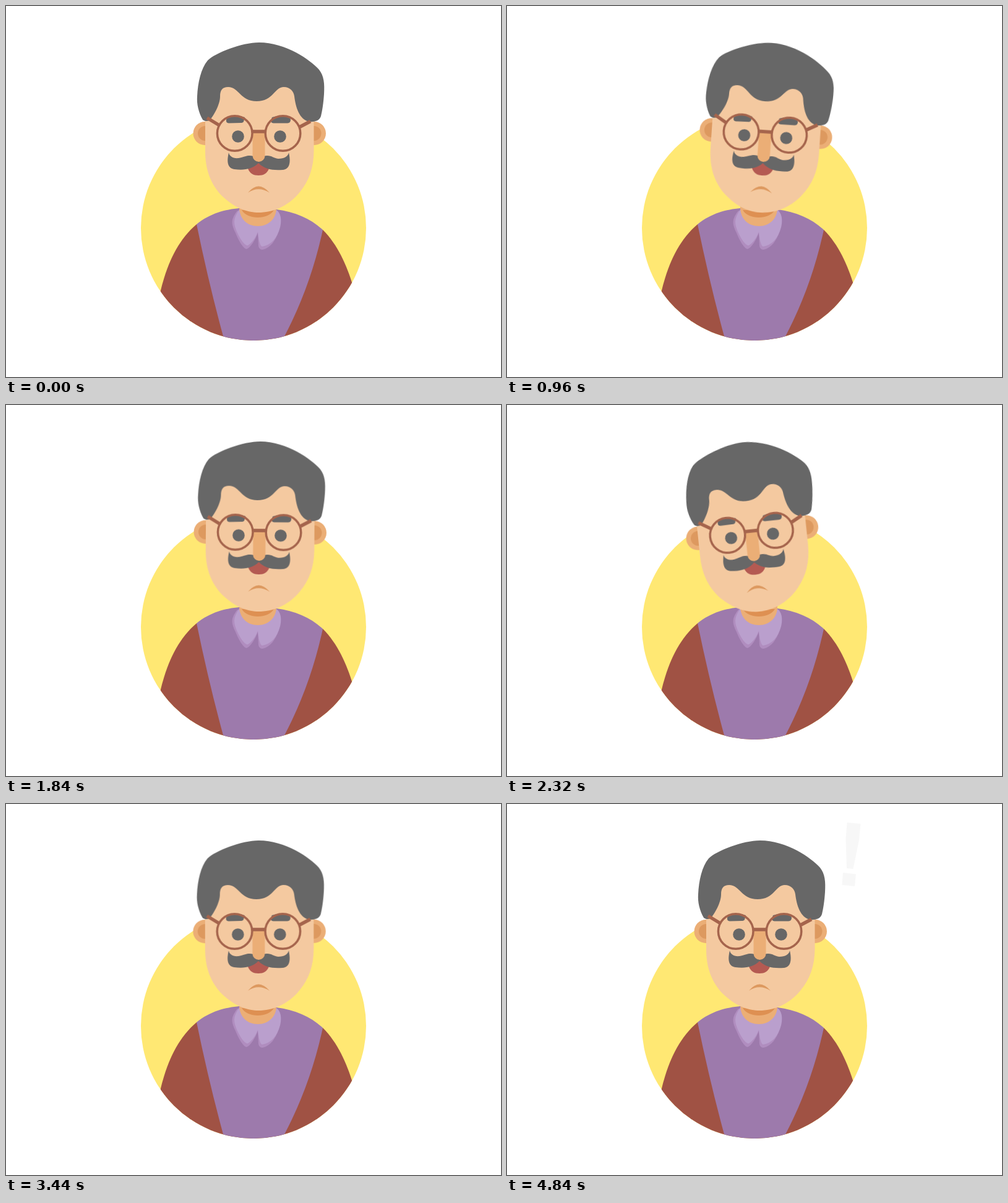
Write an HTML page that moves like this. It is 800 px wide and 600 px high and loops after 5040 ms.

```html
<!DOCTYPE html>
<html lang="en">
<head>
<meta charset="utf-8">
<title>Shaking head</title>
<style>
  html, body { margin: 0; width: 100%; height: 100%; overflow: hidden; background: #fff; }
  svg { display: block; width: 100%; height: 100%; }
  .yellow { fill: #ffe873; }
  .sleeve { fill: #a05244; }
  .vest { fill: #9d7aac; }
  .collar-back { fill: #b08dbf; }
  .collar { fill: #ba9fcd; }
  .skin { fill: #f4c9a0; }
  .tan { fill: #ebae76; }
  .shade { fill: #dd995f; }
  .shadow { fill: #de9052; }
  .lips { fill: #b45a52; }
  .grey { fill: #676767; }
  .glasses { fill: none; stroke: #a5644c; stroke-width: 3.5; }

  .head {
    transform-origin: 409px 336px;
    animation: shake 5040ms cubic-bezier(.33, 0, .67, 1) infinite;
  }
  .mark {
    transform-origin: 552px 132px;
    animation: pop 5040ms ease-out infinite, fade 5040ms linear infinite;
  }
  @keyframes shake {
    0%, 7.2% { transform: rotate(0deg); }
    27.1% { transform: rotate(6deg); }
    46.9% { transform: rotate(-6deg); }
    50% { transform: rotate(-6deg); }
    69.8%, 100% { transform: rotate(0deg); }
  }
  @keyframes pop {
    0%, 69.05% { transform: rotate(-5deg) scale(0); }
    73% { transform: rotate(5deg) scale(1); }
    75.4% { transform: rotate(-2deg) scale(1); }
    77.78%, 100% { transform: rotate(0deg) scale(1); }
  }
  @keyframes fade {
    0%, 84.92% { opacity: 1; }
    96.03%, 100% { opacity: .05; }
  }
</style>
</head>
<body>
<svg viewBox="0 0 800 600">
  <defs>
    <clipPath id="disc"><circle cx="400" cy="359" r="182"/></clipPath>
  </defs>

  <circle class="yellow" cx="400" cy="359" r="182"/>

  <g clip-path="url(#disc)">
    <path class="sleeve" d="M249 464C259 421 276 380 308 353L512 362C536 386 550 418 560 450V560H249Z"/>
    <path class="vest" d="M308 353C330 335 355 329 377 327L437 329C468 333 494 345 512 362Q492 455 449 536V560H358L351 534Q328 450 308 353Z"/>
  </g>

  <path class="collar-back" d="M374 331C364 344 363 351 371 367C376 380 384 393 389 393C395 391 403 378 407 367L408 388C409 392 411 394 415 394C428 391 436 378 440 366L407 340Z"/>
  <path class="collar" d="M377 329C367 345 367 350 374 367C379 378 387 389 391 387C397 384 404 374 407 365C408 376 410 388 414 389C428 387 438 376 443 358C445 350 446 336 437 330Z"/>
  <path class="tan" d="M377 320V327C378 345 390 356 407 356C425 356 437 343 437 327V320Z"/>
  <path class="shadow" d="M381 330C390 346 424 346 433 330Z"/>

  <g class="head">
    <circle class="tan" cx="321.5" cy="206" r="19"/>
    <circle class="tan" cx="498" cy="206" r="19"/>
    <circle class="shade" cx="322" cy="206" r="12"/>
    <circle class="shade" cx="497.500" cy="206" r="12"/>
    <path class="skin" d="M322 120V235C322 265 331 289 350 308C371 328 392 334 408 334C430 334 455 325 474 302C490 283 497 262 497.500 235V120Z"/>
    <path class="grey" d="M318 184C311 172 308 158 309 146C310 124 315 101 326 88C338 76 381 59 409 59C452 59 492 87 506 103C514 113 515 126 514 142C513 158 511 170 509 178C507 186 497 188 490 187C474 184 468 163 466 146C465 138 459 131 449 131C434 131 432 154 405 154C379 154 376 131 359 131C350 131 346 136 346 146C346 160 335 178 329 185C325 187 320 186 318 184Z"/>

    <path class="grey" d="M357 181Q370 174 386 180L384 187Q383 189 379 189L360 189.500Q355 189 356 184Z"/>
    <path class="grey" d="M459 181Q446 174 430 180L428 185Q428 189 432 189.500L455 189.500Q460 189 460 184Z"/>
    <circle class="grey" cx="375" cy="211" r="9.800"/>
    <circle class="grey" cx="443" cy="211" r="9.800"/>

    <path class="lips" d="M408 252L391 263C394 271 400 274 408 274C416 274 422 271 425 263Z"/>
    <path class="grey" d="M360 237C361 243 367 247 376 246C386 244 388 242 394 242C402 242 405 246 408 249C411 246 414 242 422 242C430 242 432 246 440 247C450 247 456 243 457 237C460 250 460 264 447 265C430 266 418 264 408 254C398 264 385 266 369 264C357 262 357 250 360 237Z"/>
    <path class="tan" d="M398.500 203H418.500V242A10 10 0 0 1 398.500 242Z"/>
    <path class="shade" d="M391 302Q408 281 426 302Q408 290.500 391 302Z"/>

    <g class="glasses">
      <circle cx="369.700" cy="206" r="28.300"/>
      <circle cx="447.500" cy="206" r="28.300"/>
      <path stroke-width="5.500" d="M399 203H418.500M325 181L344 192.500M492 186.500L474 196"/>
    </g>
  </g>

  <path class="mark grey" d="M549.500 30L571.500 32L569 58L559.500 105L549 104L547.500 56ZM543 111L564 113.500L562 133L541.500 131Z"/>
</svg>
</body>
</html>
```
